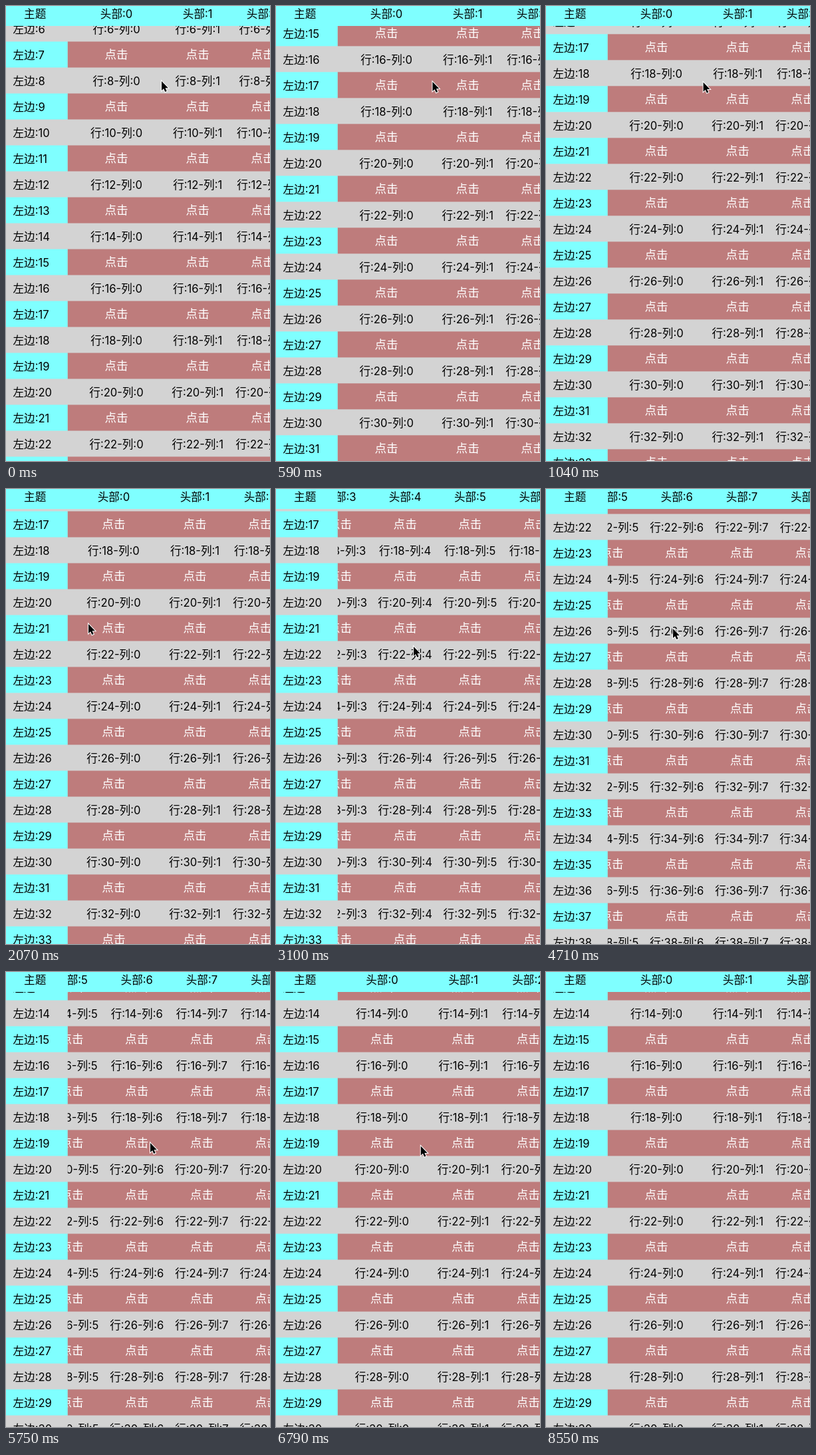
Recreate the animation shown at these times as an HTML page with a canvas. Size 397x684 px, loop 8.7 s.

```html
<!DOCTYPE html>
<html lang="zh">
<head>
<meta charset="utf-8">
<style>
  html, body { margin: 0; height: 100%; overflow: hidden; }
  canvas { display: block; }
</style>
</head>
<body>
<canvas id="stage" width="397" height="684"></canvas>
<script>
const ctx = document.getElementById('stage').getContext('2d');
const W = 397, H = 684, HEAD = 30, LEFT = 92.8, ROW = 39, COL = 97.7, FIRST = COL * 1.5;
const CYAN = '#7fffff', GRAY = '#d3d3d3', RED = '#be7c7c';
const LOOP = 8700, STEP = 147.45, LAST_STEP = 58;
const FAMILY = 'Inter, "Noto Sans CJK SC", "Noto Sans CJK", sans-serif';

// Distance covered by a flick that slows to a stop.
function flick(t, start, end, distance, power = 3) {
  const p = Math.min(1, Math.max(0, (t - start) / (end - start)));
  return distance * (1 - (1 - p) ** power);
}

const scrollY = t => 249.5 + flick(t, 0, 1925, 410, 5) + flick(t, 3100, 3540, 191, 2) + flick(t, 4790, 5700, -317);
const scrollX = t => flick(t, 2060, 3250, 388) + flick(t, 3600, 4750, 192) + flick(t, 5760, 7080, -580);

// The mouse rests near these points: [time, x, y]
const stops = [
  [0, 233, 112], [1200, 236, 114], [2064, 123, 202], [3096, 206, 236], [4718, 190, 209],
  [5750, 216, 256], [7080, 217, 262], [7370, 188, 256], [7560, 188, 256], [8550, 372, 705]
];

function pointerAt(t) {
  const i = Math.max(1, stops.findIndex(s => s[0] >= t));
  const [t0, x0, y0] = stops[i - 1], [t1, x1, y1] = stops[i];
  const p = (t - t0) / (t1 - t0);
  return [x0 + (x1 - x0) * p, y0 + (y1 - y0) * p];
}

function rect(color, x, y, w, h) {
  ctx.fillStyle = color;
  ctx.fillRect(x, y, w, h);
}

function label(text, x, baseline, align = 'center', size = 16.6, color = '#000') {
  ctx.font = `${size}px ${FAMILY}`;
  ctx.textAlign = align;
  ctx.fillStyle = color;
  ctx.fillText(text, x, baseline);
}

function clipped(x, y, paint) {
  ctx.save();
  ctx.beginPath();
  ctx.rect(x, y, W - x, H - y);
  ctx.clip();
  paint();
  ctx.restore();
}

function drawPointer(x, y) {
  ctx.save();
  ctx.translate(x + 0.5, y + 0.5);
  const arrow = new Path2D('M.5.5V14.5L3.6 11.7 5.8 16.6 8.2 15.6 6 10.8H10.4Z');
  ctx.lineWidth = 2;
  ctx.strokeStyle = '#fff';
  ctx.stroke(arrow);
  ctx.fillStyle = '#000';
  ctx.fill(arrow);
  ctx.restore();
}

function draw(t) {
  const sx = scrollX(t), sy = scrollY(t);
  const rowTop = r => HEAD + r * ROW - sy;
  const colMid = c => LEFT - sx + (c ? FIRST + (c - 0.5) * COL : FIRST / 2);
  const rows = [], cols = [];
  for (let r = Math.floor(sy / ROW); rowTop(r) < H; r++) rows.push(r);
  for (let c = 0; colMid(c) < W + COL; c++) if (colMid(c) > 0) cols.push(c);

  rect(GRAY, 0, 0, W, H);
  clipped(0, HEAD, () => {
    for (const r of rows) {
      if (r % 2) {
        rect(CYAN, 0, rowTop(r), LEFT, ROW);
        rect(RED, LEFT, rowTop(r), W - LEFT, ROW);
      }
      label('左边:' + r, 10.5, rowTop(r) + 26.5, 'left');
    }
  });
  clipped(LEFT, HEAD, () => {
    for (const r of rows) for (const c of cols) {
      if (r % 2) label('点击', colMid(c), rowTop(r) + 25.5, 'center', 17.6, '#fff');
      else label(`行:${r}-列:${c}`, colMid(c), rowTop(r) + 26.5);
    }
  });

  rect(CYAN, 0, 0, W, HEAD);
  label('主题', 43.7, 18);
  clipped(LEFT, 0, () => cols.forEach(c => label('头部:' + c, colMid(c), 18)));
  drawPointer(...pointerAt(t));
}

function tick() {
  const t = performance.now() % LOOP;
  const step = Math.min(LAST_STEP, Math.floor((t + 9) / STEP));
  draw(Math.min(step * STEP, 8550));
  requestAnimationFrame(tick);
}
tick();
</script>
</body>
</html>
```
